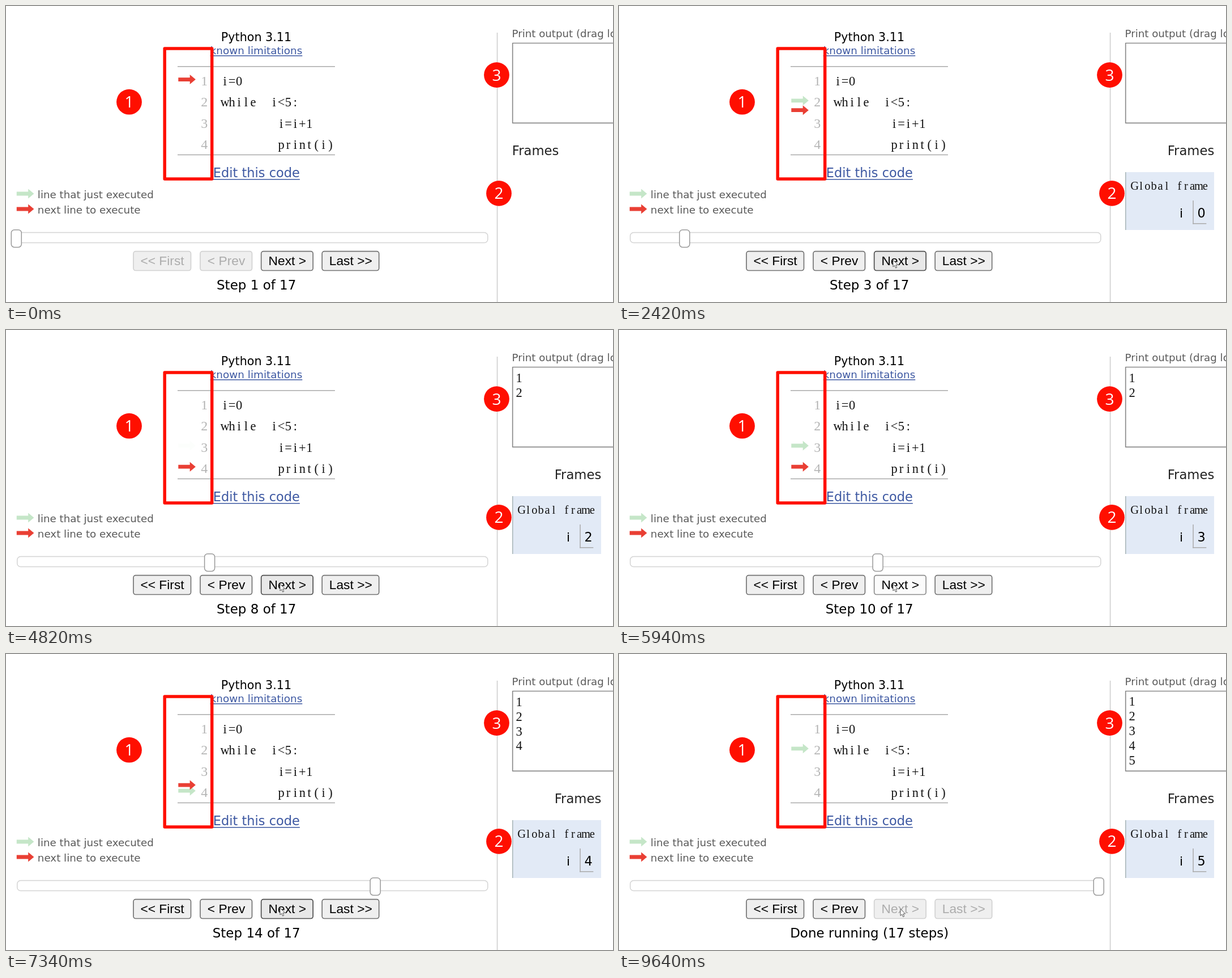
Write an HTML page with a canvas that moves like this. It is 1072 px wide and 522 px high and loops after 9680 ms.

```html
<!DOCTYPE html>
<html lang="en">
<head>
<meta charset="utf-8">
<title>Step-by-step code run</title>
<style>
html, body { margin: 0; width: 100%; height: 100%; overflow: hidden; background: #fff; }
canvas { display: block; width: 1072px; height: 522px; }
</style>
</head>
<body>
<canvas id="stage" width="1072" height="522"></canvas>
<script>
const ctx = document.getElementById('stage').getContext('2d');
const LOOP = 9680;
const SANS = '"DejaVu Sans", Verdana, sans-serif';
const UI = '"Liberation Sans", Arial, sans-serif';
const SERIF = '"Liberation Serif", serif';
const BADGE = '"Open Sans", "Noto Sans", sans-serif';
const RED = '#e93f34', GREEN = '#c5e6c8', MARK = '#ff0f00', LINK = '#3d58a2';

// Moments at which each next step appears
const STEPS = [1370, 2180, 2700, 3330, 3940, 4400, 4820, 5210, 5590,
  5980, 6370, 6750, 7140, 7520, 7880, 8260, 9110];
const PRESS = 100, HOLD = 120, SLIDE = 250;
const LAST = STEPS.length;

const CODE = ['i=0', 'while  i<5:', '        i=i+1', '        print(i)'];
const BUTTONS = [
  ['<< First', 225, 101.5], ['< Prev', 343, 91.5], ['Next >', 450.7, 91.5], ['Last >>', 558.2, 100.5]
];

const clamp = u => Math.max(0, Math.min(1, u));
const mix = (a, b, u) => a + (b - a) * u;
const cubic = u => u < .5 ? 4 * u ** 3 : 1 - 4 * (1 - u) ** 3;
const lineAt = k => k ? 2 + (k - 1) % 3 : 1;
const lineY = n => 129.6 + 37.2 * (n - 1);

function text(s, x, y, size, family, color, align = 'left') {
  ctx.font = `${size}px ${family}`;
  ctx.fillStyle = color;
  ctx.textAlign = align;
  ctx.fillText(s, x, y);
}

// Fixed-pitch serif type: each character centred in its own cell
function typed(s, x, y, size, pitch) {
  [...s].forEach((c, n) => text(c, x + pitch * (n + .5), y, size, SERIF, '#111', 'center'));
}

function link(s, x, y, size, gap) {
  text(s, x, y, size, SANS, LINK, 'center');
  const w = ctx.measureText(s).width;
  rect(x - w / 2, y + gap, w, 1.5, LINK);
}

function rect(x, y, w, h, color) {
  ctx.fillStyle = color;
  ctx.fillRect(x, y, w, h);
}

function panel(x, y, w, h, r, fill, stroke, width = 1.5) {
  ctx.beginPath();
  ctx.roundRect(x, y, w, h, r);
  ctx.fillStyle = fill;
  ctx.fill();
  ctx.strokeStyle = stroke;
  ctx.lineWidth = width;
  ctx.stroke();
}

function shape(points, x, y, scale) {
  ctx.beginPath();
  for (const [px, py] of points) ctx.lineTo(x + px * scale, y + py * scale);
  ctx.closePath();
}

function arrow(x, y, color, alpha = 1) {
  const points = [[0, 3], [12, 3], [12, 0], [18, 5], [12, 10], [12, 7], [0, 7]];
  shape(points, x, y - 8.5, 1.7);
  ctx.globalAlpha = alpha;
  ctx.fillStyle = color;
  ctx.fill();
  ctx.globalAlpha = 1;
}

function badge(n, x, y) {
  ctx.beginPath();
  ctx.arc(x, y, 22.4, 0, Math.PI * 2);
  ctx.fillStyle = MARK;
  ctx.fill();
  text(n, x, y + 10, 28, BADGE, '#fff', 'center');
}

function gutter(k, age) {
  const from = lineY(lineAt(k - 1)), settled = age >= HOLD;
  if (k > 0 && settled) arrow(304.3, from, GREEN);
  if (k > 1 && !settled) arrow(304.3, lineY(lineAt(k - 2)), GREEN, .06);
  if (k === LAST) return;
  const u = cubic(clamp((age - HOLD) / SLIDE));
  arrow(304.3, k ? mix(from, lineY(lineAt(k)), u) : lineY(1), RED);
}

function code(k, age) {
  text('Python 3.11', 442, 62, 20.7, SANS, '#000', 'center');
  link('known limitations', 442, 85, 18.4, 2);
  link('Edit this code', 442.3, 302, 22.5, 3);
  rect(303, 106, 278, 1.5, '#aaa');
  rect(303, 261.7, 278, 1.5, '#aaa');
  CODE.forEach((s, n) => {
    const y = 140 + 37.3 * n;
    text(n + 1, 350.3, y, 24, SERIF, '#b4b4b4', 'center');
    typed(s, 380.5, y, 22.5, 12.42);
  });
  gutter(k, age);
  ctx.strokeStyle = MARK;
  ctx.lineWidth = 5.5;
  ctx.lineJoin = 'round';
  ctx.strokeRect(280.2, 75, 83.5, 230);
}

function controls(k, hover, pressed) {
  arrow(18.8, 331, GREEN);
  arrow(18.8, 358, RED);
  text('line that just executed', 55.8, 339, 18.3, SANS, '#5a5a5a');
  text('next line to execute', 55.8, 366, 18.3, SANS, '#5a5a5a');

  panel(19.8, 399.5, 831, 18, 6, '#fff', '#d4d4d4');
  panel(9.3 + 48.76 * k, 394.7, 18, 30.8, 5.5, '#fff', '#999');

  BUTTONS.forEach(([label, x, w], n) => {
    const off = n < 2 ? k === 0 : k === LAST;
    let fill = '#efefef', edge = '#747474';
    if (off) edge = '#d2d2d2';
    else if (n === 2 && pressed) { fill = '#fbfbfb'; edge = '#8d8d8d'; }
    else if (n === 2 && hover) { fill = '#e8e8e8'; edge = '#4f4f4f'; }
    panel(x, 432.7, w, 33.8, 4, fill, edge, 1.7);
    text(label, x + w / 2 + .3, 457.3, 22.8, UI, off ? '#acacac' : '#000', 'center');
  });

  const status = k === LAST ? 'Done running (17 steps)' : `Step ${k + 1} of 17`;
  text(status, 442.2, 500, 23, SANS, '#000', 'center');
}

function state(k) {
  rect(866.8, 47, 1.5, 475, '#ccc');
  text('Print output (drag lower right corner to resize)', 893.6, 55, 18.2, SANS, '#5a5a5a');
  panel(894.7, 65.5, 300, 140.8, 0, '#fff', '#8a8a8a', 1.7);
  const shift = k >= LAST - 1 ? .7 : 0;
  for (let n = 0; n < Math.floor((k - 1) / 3); n++)
    text(n + 1, 906, 92 + 25.8 * n - shift, 22.5, SERIF, '#111', 'center');

  if (k === 0) {
    text('Frames', 893.8, 263, 22.7, SANS, '#222');
  } else {
    text('Frames', 1051.2, 263, 22.7, SANS, '#222', 'right');
    rect(894, 293, 157, 102, '#e2eaf6');
    rect(894, 293, 1.5, 102, '#a6b3b6');
    typed('Global frame', 905, 324, 20.5, 11.33);
    text('i', 993, 373, 22, SANS, '#000', 'center');
    rect(1013.3, 343, 1.5, 41.5, '#aaa');
    rect(1013.3, 383, 24, 1.5, '#aaa');
    text(Math.floor(k / 3), 1028.7, 372.5, 22.3, SANS, '#000', 'center');
  }
}

function pointerAt(t) {
  if (t < 410) return null;
  if (t >= 9640) return [497, 449.5];
  if (t < 1000) {
    const u = 1 - (1 - clamp((t - 400) / 410)) ** 2;
    return [mix(760, 459, u), mix(512, 434, u)];
  }
  const u = clamp((t - 980) / 110);
  return [mix(459, 484, u), mix(434, 448, u)];
}

function pointer([x, y]) {
  shape([[0, 0], [0, 12], [2.7, 9.5], [4.7, 14], [6.8, 13], [4.8, 8.8], [8.6, 8.6]], x, y, 1);
  ctx.fillStyle = '#fff';
  ctx.fill();
  ctx.strokeStyle = '#555';
  ctx.lineWidth = 1;
  ctx.stroke();
}

function draw(t) {
  const k = STEPS.filter(s => t >= s).length;
  const age = k ? t - STEPS[k - 1] : 0;
  const lead = k === 0 ? 120 : k === LAST - 1 ? 80 : PRESS;
  const pressed = k < LAST && t >= STEPS[k] - lead;
  const spot = pointerAt(t);
  rect(0, 0, 1072, 522, '#fff');
  code(k, age);
  controls(k, spot && spot[0] < 543 && spot[1] < 467, pressed);
  state(k);
  badge(1, 217.5, 169.2);
  badge(3, 866.5, 121.6);
  badge(2, 870.5, 330.4);
  if (spot) pointer(spot);
}

const start = performance.now();
function tick() {
  draw((performance.now() - start) % LOOP);
  requestAnimationFrame(tick);
}
tick();
</script>
</body>
</html>
```
